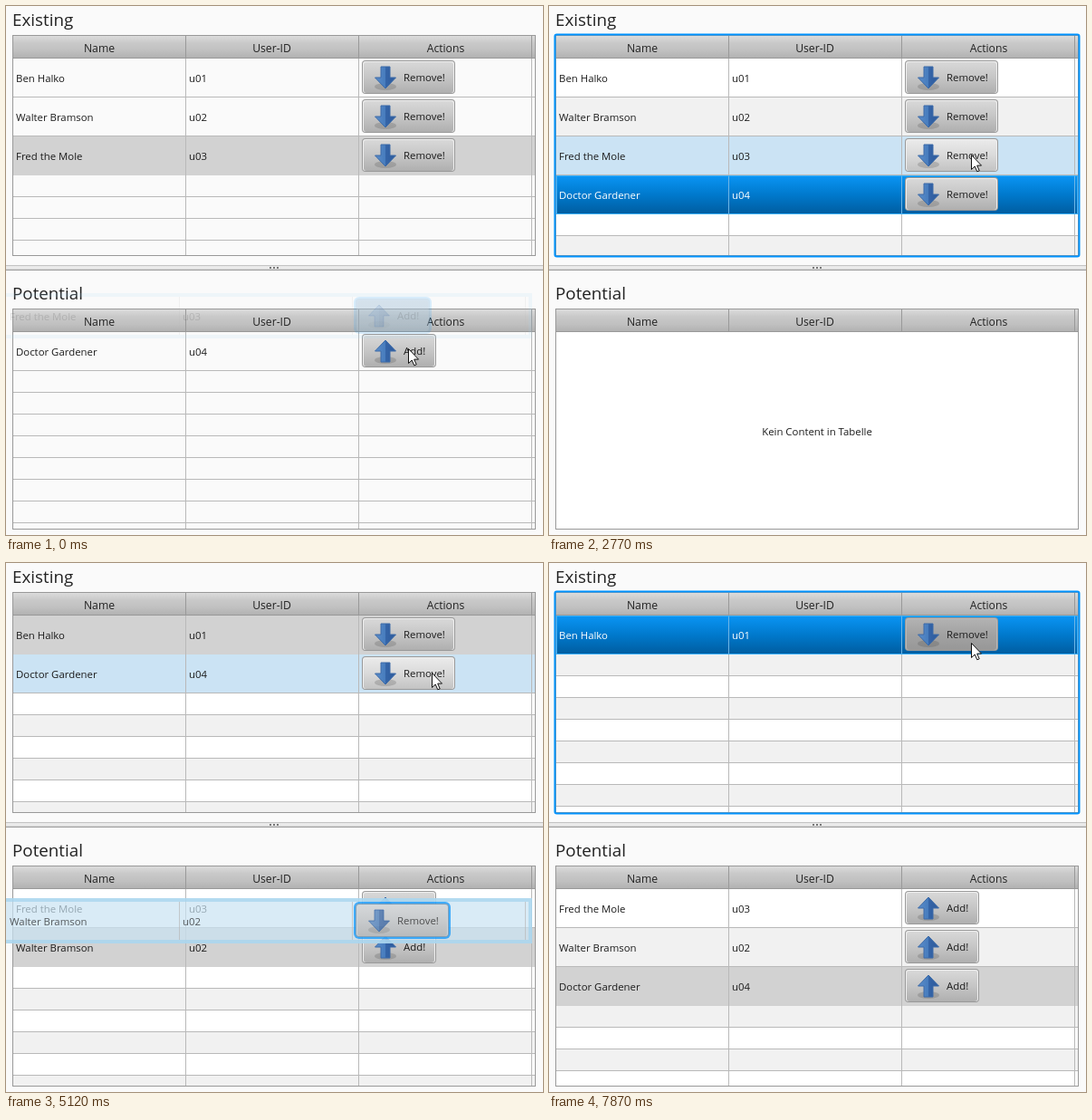
Write an HTML page with a canvas that moves like this. It is 593 px wide and 584 px high and loops after 8000 ms.

```html
<!DOCTYPE html>
<html lang="en">
<head>
<meta charset="utf-8">
<title>Moving rows between two tables</title>
<style>
  html, body { margin: 0; width: 100%; height: 100%; overflow: hidden; background: #fafafa; }
  canvas { display: block; }
</style>
</head>
<body>
<canvas id="stage" width="593" height="584"></canvas>
<script>
const ctx = document.getElementById('stage').getContext('2d');
const LOOP = 8000, ROW = 43, EMPTY_ROW = 24, GHOST_TIME = 500;
const FONT = '"Open Sans", "Noto Sans", sans-serif';
const DIVIDERS = [198, 389, 580];
const BLUE = '#0093ff';
const people = ['Ben Halko', 'Walter Bramson', 'Fred the Mole', 'Doctor Gardener'];

// lists: people in each table; selected: index per table; pressed: table whose button is held
const states = [
  { at: 0, lists: [[0, 1, 2], [3]], selected: [2, -1], plain: [true, true] },
  { at: 480, focus: true, plain: [false, true] },
  { at: 1310, focus: false, pressed: 1, selected: [2, 0] },
  { at: 1430, pressed: -1, lists: [[0, 1, 2, 3], []], selected: [3, -1], plain: [false, false] },
  { at: 1860, focus: true },
  { at: 3300, focus: false, pressed: 0, selected: [2, -1] },
  { at: 3570, pressed: -1, lists: [[0, 1, 3], [2]], selected: [1, 0] },
  { at: 4080, focus: true },
  { at: 4610, focus: false, pressed: 0 },
  { at: 4730, pressed: -1, lists: [[0, 3], [2, 1]], selected: [0, 1] },
  { at: 5270, focus: true },
  { at: 7300, focus: false, pressed: 0, selected: [1, 1] },
  { at: 7450, pressed: -1, lists: [[0], [2, 1, 3]], selected: [0, 2] },
  { at: 7870, focus: true, armed: true },
];

// time, x, y of the pointer tip
const pointerStops = [
  [0, 444, 378], [2110, 443, 364], [2230, 441, 340], [2380, 449, 275], [2500, 459, 205],
  [2620, 465, 166], [2770, 466, 164], [4610, 470, 121], [5420, 464, 170], [5540, 452, 226],
  [5660, 438, 290], [5780, 428, 340], [5900, 426, 384], [6450, 434, 341], [6600, 452, 222],
  [6750, 462, 150], [6870, 465, 120], [7020, 465, 124], [7720, 466, 88],
];

// from / to are row centres
const ghosts = [
  { start: -122, shown: 0, person: 2, add: true, from: 381, to: 165 },
  { start: 1325, shown: 1430, person: 3, add: true, from: 381, to: 208 },
  { start: 3482, shown: 3720, person: 2, add: false, from: 165, to: 381 },
  { start: 4708, shown: 4880, person: 1, add: false, from: 122, to: 424 },
  { start: 7345, shown: 7450, person: 3, add: false, from: 122, to: 467 },
];

function easeBoth(t) {
  if (t < 0.2) return 3.125 * t * t;
  if (t > 0.8) return 1 - 3.125 * (1 - t) ** 2;
  return 1.25 * t - 0.125;
}

function rect(x, y, w, h, fill) {
  ctx.fillStyle = fill;
  ctx.fillRect(x, y, w, h);
}

function frame(x, y, w, h, color, width = 1) {
  ctx.strokeStyle = color;
  ctx.lineWidth = width;
  ctx.strokeRect(x, y, w, h);
}

function text(str, x, y, size, color = '#1c1c1c', align = 'left') {
  ctx.font = `${size}px ${FONT}`;
  ctx.textAlign = align;
  ctx.fillStyle = color;
  ctx.fillText(str, x, y);
}

function vertical(y, height, ...stops) {
  const g = ctx.createLinearGradient(0, y, 0, y + height);
  stops.forEach((c, i) => g.addColorStop(i / (stops.length - 1), c));
  return g;
}

function roundBox(x, y, w, h, r, fill) {
  ctx.beginPath();
  ctx.roundRect(x, y, w, h, r);
  ctx.fillStyle = fill;
  ctx.fill();
}

function polygon(points, fill, stroke) {
  ctx.beginPath();
  points.forEach(([x, y]) => ctx.lineTo(x, y));
  ctx.closePath();
  ctx.fillStyle = fill;
  ctx.fill();
  ctx.strokeStyle = stroke;
  ctx.lineWidth = 1;
  ctx.stroke();
}

function arrowIcon(cx, cy, up) {
  ctx.beginPath();
  ctx.ellipse(cx, cy + 10, 12, 4, 0, 0, 7);
  ctx.fillStyle = 'rgba(70,70,70,.22)';
  ctx.fill();
  const dir = up ? -1 : 1;
  const shape = [[-5, -12], [5, -12], [5, 0], [11.5, 0], [0, 12], [-11.5, 0], [-5, 0]];
  const fill = ctx.createLinearGradient(cx - 11, 0, cx + 11, 0);
  [[0, '#5a8cc9'], [0.5, '#477cbd'], [0.52, '#3565a8'], [1, '#2d5a9c']]
    .forEach(([p, c]) => fill.addColorStop(p, c));
  polygon(shape.map(([x, y]) => [cx + x, cy + y * dir]), fill, '#3c6ba8');
}

function button(x, y, add, look) {
  const w = add ? 82 : 103, h = 37;
  const fills = {
    normal: ['#dadada', '#c6c6c6', '#aeaeae'],
    hover: ['#ececec', '#dadada', '#c2c2c2'],
    armed: ['#b4b4b4', '#a2a2a2', '#979797'],
  };
  if (look.focused) roundBox(x - 2, y - 2, w + 4, h + 4, 6, BLUE);
  roundBox(x, y, w, h, 4, '#999');
  roundBox(x + 1, y + 1, w - 2, h - 2, 3, look.armed ? '#b8b8b8' : '#eee');
  roundBox(x + 2, y + 2, w - 4, h - 3, 3, vertical(y, h, ...fills[look.armed ? 'armed' : look.hover ? 'hover' : 'normal']));
  arrowIcon(x + 26, y + 19, add);
  text(add ? 'Add!' : 'Remove!', x + 46, y + 23, 11.4);
}

function rowFill(y, look, stripe) {
  if (look.active) return vertical(y, ROW, '#0a95f5', '#0079cc', '#005c9f');
  if (look.hover) return '#cbe3f4';
  return look.selected ? '#d2d2d2' : stripe;
}

function drawTable(index, top, state, pointer) {
  const add = index === 1, bodyTop = top + 26, bottom = top + 243;
  const people_ = state.lists[index], focused = !add && state.focus;
  const stripe = i => state.plain[index] ? '#fafafa' : i % 2 ? '#f1f1f1' : '#fff';

  text(add ? 'Potential' : 'Existing', 7, top - 10, 18.8, '#222');
  rect(7, top, 578, 244, '#fff');
  ctx.save();
  ctx.beginPath();
  ctx.rect(8, top + 1, 576, 242);
  ctx.clip();

  rect(8, top + 1, 576, 25, vertical(top, 26, '#dedede', '#c9c9c9', '#c0c0c0', '#b0b0b0'));
  rect(8, top + 25, 576, 1, '#999');
  DIVIDERS.forEach(x => rect(x, top + 1, 1, 25, '#999'));
  ['Name', 'User-ID', 'Actions'].forEach((label, i) =>
    text(label, [103, 293.5, 485.5][i], top + 19, 12.2, '#222', 'center'));

  if (!people_.length) text('Kein Content in Tabelle', 296, top + 140, 11.4, '#1c1c1c', 'center');

  let y = bodyTop;
  for (let i = 0; people_.length && y < bottom; i++) {
    const filled = i < people_.length, height = filled ? ROW : EMPTY_ROW;
    const hover = filled && pointer.live && pointer.y >= y && pointer.y < y + ROW;
    const selected = filled && state.selected[index] === i;
    const active = selected && focused;
    const pressed = selected && state.pressed === index;
    rect(8, y, 576, height, rowFill(y, { active, hover, selected }, stripe(i)));
    if (!selected || active) rect(8, y + height - 1, 576, 1, active ? '#4fb5f0' : '#b9b9b9');
    DIVIDERS.forEach(x => rect(x, y, 1, height, active ? '#6fb6e6' : '#b9b9b9'));
    if (active) frame(8.5, y + 0.5, 575, ROW - 1, '#3db2fa');
    if (pressed) frame(9, y + 1, 574, ROW - 2, BLUE, 2);
    if (filled) {
      const color = active ? '#fff' : '#1c1c1c', id = people_[i];
      text(people[id], 11, y + 26, 11.4, color);
      text('u0' + (id + 1), 202, y + 26, 11.4, color);
      const over = hover && pointer.x >= 393 && pointer.x < (add ? 475 : 496)
        && pointer.y >= y + 2 && pointer.y < y + 39;
      button(393, y + 2, add, { hover: over, focused: pressed, armed: pressed || (over && state.armed) });
    }
    y += height;
  }
  ctx.restore();
  frame(7.5, top + 0.5, 577, 243, '#999');
  if (focused) {
    ctx.beginPath();
    ctx.roundRect(6.5, top - 0.5, 579, 245, 2);
    ctx.strokeStyle = BLUE;
    ctx.lineWidth = 2;
    ctx.stroke();
  }
}

function drawSplitter() {
  rect(0, 286, 593, 6, vertical(286, 6, '#c4c4c4', '#f2f2f2', '#e2e2e2', '#cfcfcf'));
  rect(0, 286, 593, 1, '#c4c4c4');
  rect(0, 291, 593, 1, '#999');
  [291, 295, 299].forEach(x => rect(x, 288, 2, 2, '#777'));
}

function drawGhost(ghost, time) {
  const t = (time - ghost.start) / GHOST_TIME;
  if (time < ghost.shown || t >= 1) return;
  const progress = easeBoth(t);
  const y = Math.round(ghost.from + (ghost.to - ghost.from) * progress);
  ctx.save();
  ctx.globalAlpha = Math.min(0.75, 0.78 * progress);
  if (!ghost.add) rect(0, y - 25, 581, 50, '#c9e3f3');
  rect(0, y - 25, 581, 4, '#a3d4ee');
  rect(0, y + 21, 581, 4, '#a3d4ee');
  rect(577, y - 21, 4, 42, '#a3d4ee');
  DIVIDERS.forEach(x => rect(x - 7, y - 21, 1, 42, '#b9b9b9'));
  text(people[ghost.person], 4, y + 5, 11.4);
  text('u0' + (ghost.person + 1), 195, y + 5, 11.4);
  button(386, y - 19, ghost.add, { focused: true });
  ctx.restore();
}

function drawPointer({ x, y }) {
  const shape = [[0, 0], [0, 16], [3.7, 12.5], [6.3, 18.3], [8.7, 17.3], [6.2, 11.6], [11, 11.6]];
  polygon(shape.map(([dx, dy]) => [x + dx + 0.5, y + dy + 0.5]), '#fff', '#111');
}

function draw(time) {
  const state = Object.assign({ pressed: -1 }, ...states.filter(s => s.at <= time));
  const [, x, y] = pointerStops.filter(([at]) => at <= time).pop();
  const pointer = { x, y, live: time >= 120 };
  rect(0, 0, 593, 584, '#fafafa');
  drawTable(0, 32, state, pointer);
  drawTable(1, 334, state, pointer);
  drawSplitter();
  ghosts.forEach(g => drawGhost(g, time));
  drawPointer(pointer);
}

const begin = performance.now();
function tick() {
  draw((performance.now() - begin) % LOOP);
  requestAnimationFrame(tick);
}
tick();
</script>
</body>
</html>
```
